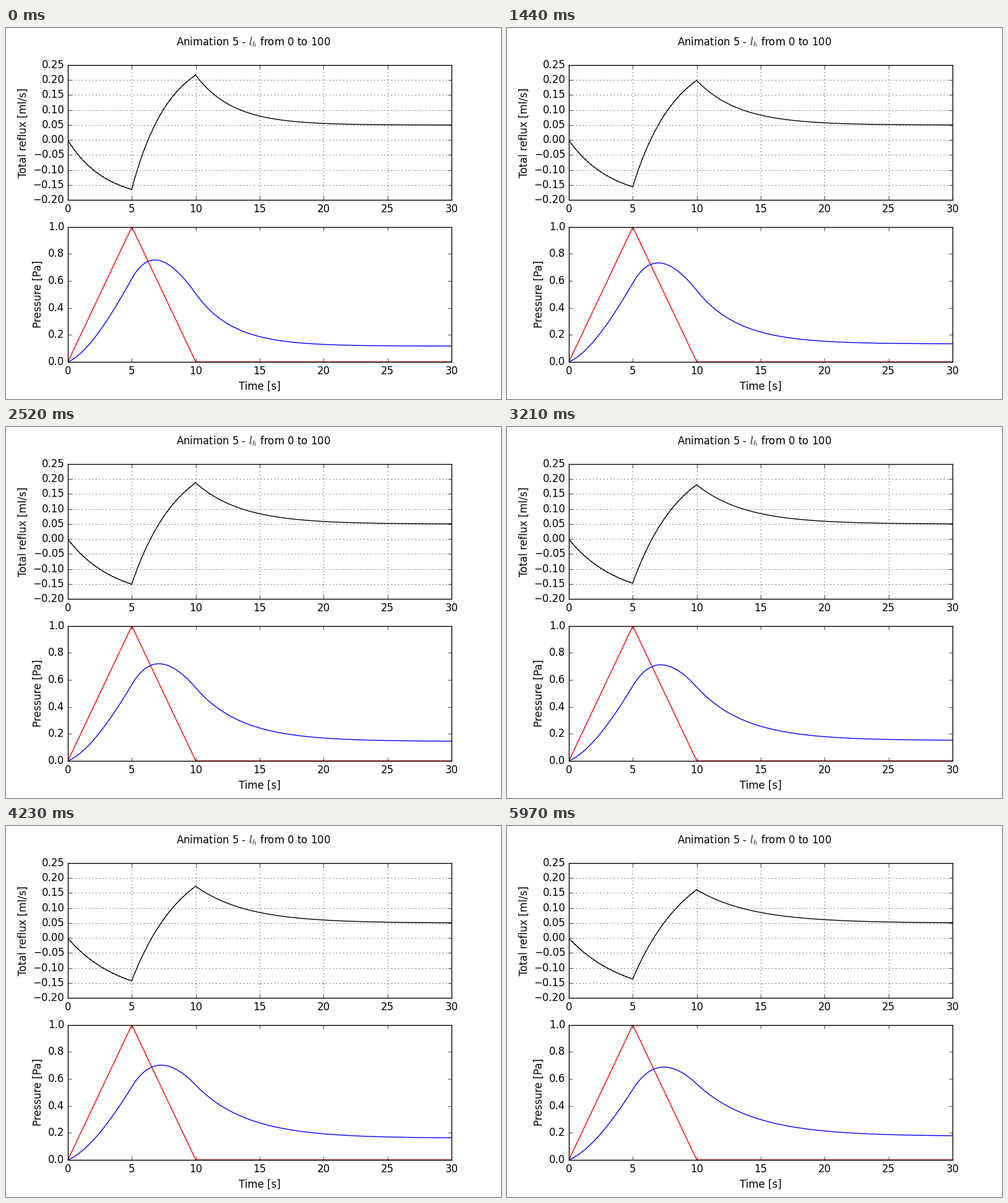
Recreate the animation shown at these times as a matplotlib script. Size 800 by 600 pixels, loop 6 s.

```python
import numpy as np
import matplotlib.pyplot as plt
from matplotlib.animation import FuncAnimation

plt.style.use("classic")
plt.rcParams.update({
    "figure.dpi": 100,
    "savefig.dpi": 100,
    "figure.facecolor": "white",
    "savefig.facecolor": "white",
    "font.family": "DejaVu Sans",
})

FRAMES, INTERVAL = 200, 30
INFLOW, COMPLIANCE = 0.05, 1.25
RISE, FALL_END, T_END = 5.0, 10.0, 30.0
RIPPLE, PERIOD = 0.004, 0.25

t = np.linspace(0, T_END, 3001)
drive = np.interp(t, [0, RISE, FALL_END, T_END], [0, 1, 0, 0])

# Sawtooth left on the driving pressure by coarse sampling
phase = ((t - 1e-9) / PERIOD) % 1.0
slope_sign = np.where(t <= RISE, 1, np.where(t <= FALL_END, -1, 0))
ripple = RIPPLE * slope_sign * phase
ripple[0] = 0


def resistance(n):
    return 2.34 + 0.0071 * n - 6.4e-6 * n * n


def ramp_response(s, p0, u0, slope, r):
    """Pressure s seconds after p0 under the drive u0 + slope * s."""
    tau = r * COMPLIANCE
    base = INFLOW * r + u0 - slope * tau
    return base + slope * s + (p0 - base) * np.exp(-s / tau)


def pressure(r):
    p5 = ramp_response(RISE, 0, 0, 0.2, r)
    p10 = ramp_response(FALL_END - RISE, p5, 1, -0.2, r)
    return np.where(
        t <= RISE, ramp_response(t, 0, 0, 0.2, r),
        np.where(t <= FALL_END,
                 ramp_response(t - RISE, p5, 1, -0.2, r),
                 ramp_response(t - FALL_END, p10, 0, 0, r)))


fig, (top, low) = plt.subplots(2, 1, figsize=(8, 6), dpi=100)
fig.suptitle("Animation 5 - $l_h$ from 0 to 100")

top.set_xlim(0, T_END)
top.set_ylim(-0.20, 0.25)
top.set_yticks(np.linspace(-0.20, 0.25, 10).round(2))
top.set_ylabel("Total reflux [ml/s]")
top.grid(True)

low.set_xlim(0, T_END)
low.set_ylim(0, 1)
low.set_xlabel("Time [s]")
low.set_ylabel("Pressure [Pa]")

flow_line, = top.plot([], [], "k")
low.plot(t, drive, "r")
pressure_line, = low.plot([], [], "b")


def update(n):
    r = resistance(n)
    p = pressure(r)
    flow_line.set_data(t, (p - drive - ripple) / r)
    pressure_line.set_data(t, p)
    return flow_line, pressure_line


anim = FuncAnimation(fig, update, frames=FRAMES, interval=INTERVAL,
                     init_func=lambda: update(0), repeat=True,
                     repeat_delay=0, blit=False)
plt.show()
```
